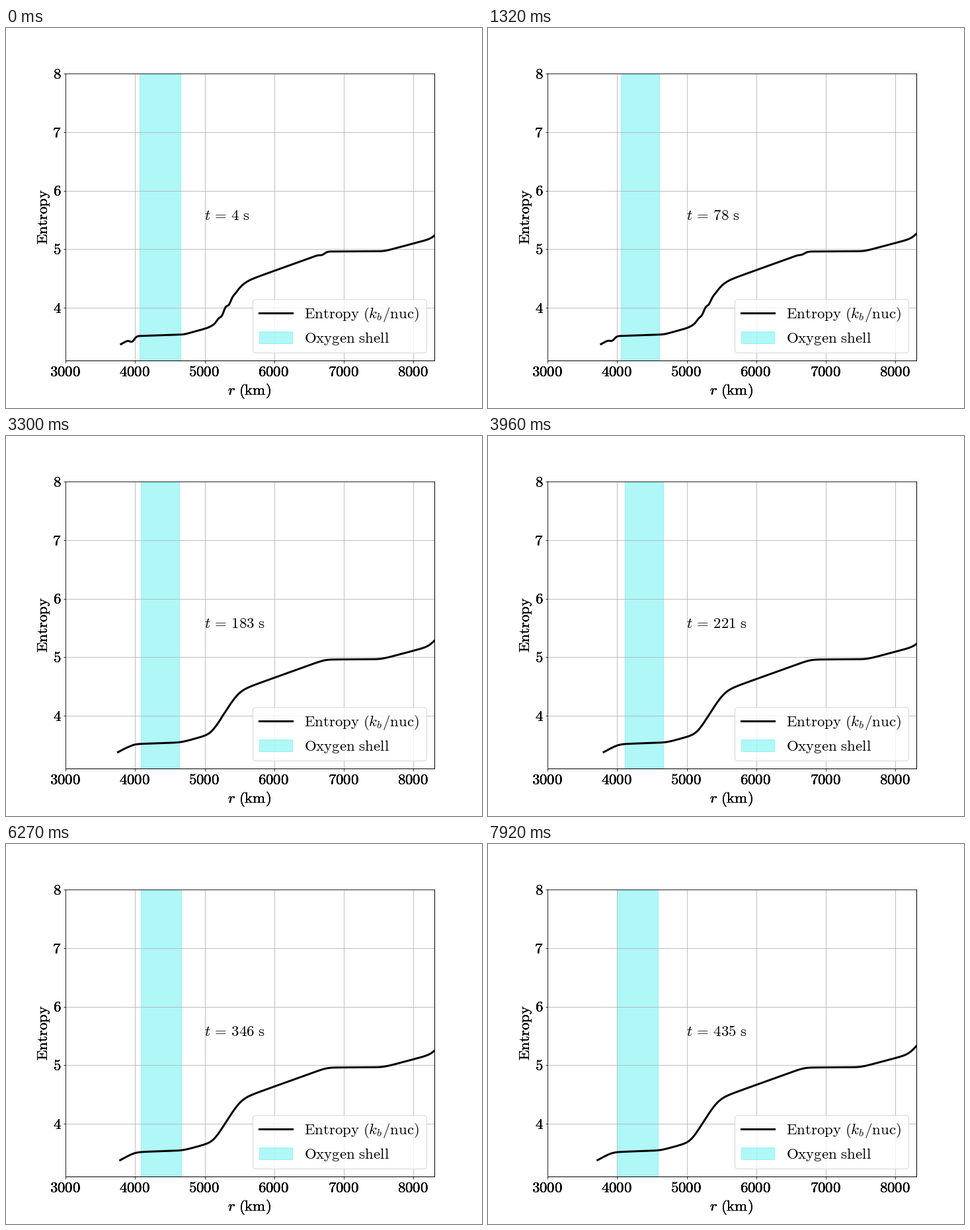
A matplotlib script that plays this animation: 720 by 576 pixels, repeating every 8000 ms.

```python
import matplotlib.pyplot as plt
import numpy as np
from matplotlib.animation import FuncAnimation
from matplotlib.patches import FancyBboxPatch, Rectangle

plt.rcParams["mathtext.fontset"] = "cm"

W, H = 720, 576
LOOP, TICK, STEP = 8000, 40, 330      # ms: loop, drawing interval, simulation step
SIZE = 22.9
SHELL = dict(color=(0, 0.9, 0.9), alpha=0.31, lw=1)

# Corners of the entropy profile in stage pixels, joined by straight runs
corner_x = np.array([176, 198, 271, 317, 358, 489, 574, 648, 660.0])
corner_y = np.array([479.2, 467, 464.6, 452, 386, 338.8, 338.4, 318.8, 304.6])
sharpness = np.array([1.2, 2, 4, 6, 1.5, 3, 4])   # early rounding of inner corners
slope = np.diff(corner_y) / np.diff(corner_x)
grid_x = np.linspace(176, 660, 500)

# Columns: step, time in s, profile shift, inner and outer shell edge
keys = np.array([
    (0, 4, -2, 202, 264), (4, 78, -5, 201, 259), (7, 130.5, -7, 200.6, 258),
    (10, 183, -6.5, 204, 262), (12, 221, -1, 207, 265), (15, 276.5, 0.6, 208, 268),
    (16, 295, 0, 207, 268), (21, 380, -5.4, 202, 263), (24, 435, -10.3, 195, 257)]).T


def bell(x, centre, width):
    return np.exp(-((x - centre) / width) ** 2)


def profile(mix):
    """Rounded polyline; early on it has sharper corners and small steps."""
    width = sharpness + (np.maximum(sharpness, 4.5) - sharpness) * mix
    y = corner_y[0] + slope[0] * (grid_x - corner_x[0])
    for x, bend, w in zip(corner_x[1:-1], np.diff(slope), width):
        y = y + bend * w * np.logaddexp(0, (grid_x - x) / w)
    ripple = 1.2 + 2.6 * np.cos(2 * np.pi * (grid_x - 328) / 12)
    steps = (5.5 * bell(grid_x, 193, 5) + 2 * bell(grid_x, 480, 5)
             + ripple * bell(grid_x, 334, 11))
    return y + (1 - mix) * steps


def to_r(x):
    return 3000 + (x - 90) * 5300 / 558


def to_entropy(y):
    return 3.1 + (504 - y) * 4.9 / 434.88


fig = plt.figure(figsize=(10, 8), dpi=72, facecolor="white")
ax = fig.add_axes([0.125, 0.125, 0.775, 0.755])
ax.set(xlim=(3000, 8300), ylim=(3.1, 8),
       xticks=range(3000, 8001, 1000), yticks=range(4, 9))
ax.tick_params(labelbottom=False, labelleft=False)
ax.grid(color="#b0b0b0", lw=0.8)
ax.spines[["right", "bottom"]].set_linewidth(1)

# Overlay measured in pixels, y downwards
stage = fig.add_axes([0, 0, 1, 1], zorder=5)
stage.set(xlim=(0, W), ylim=(H, 0))
stage.axis("off")


def label(x, y, text, ha="left", layers=1, **kw):
    for _ in range(layers):
        t = stage.text(x, y, text, fontsize=SIZE, ha=ha, va="baseline", **kw)
    return t


for r in range(3000, 8001, 1000):
    label(89 + (r - 3000) * 558 / 5300, 527.7, f"${r}$", "center", 4)
for s in range(4, 9):
    label(83.6, 511.7 - (s - 3.1) * 88.75, f"${s}$", "right", 4)
label(368.3, 556.3, r"$r\ \mathrm{(km)}$", "center", 4)
label(63, 286.3, r"$\mathrm{Entropy}$", "center", 4, rotation=90, rotation_mode="anchor")

stage.add_patch(FancyBboxPatch((373.5, 411.5), 263, 81, fc="white", ec="0.8",
                               alpha=0.8, lw=1,
                               boxstyle="round,pad=0,rounding_size=4.8"))
stage.plot([383, 433], [432, 432], color="black", lw=3)
stage.add_patch(Rectangle((383, 460), 50, 18, **SHELL))
label(450.6, 440.4, r"$\mathrm{Entropy\ (}k_b\mathrm{/nuc)}$")
label(450.6, 477.4, r"$\mathrm{Oxygen\ shell}$")

shell = Rectangle((4000, 3.1), 600, 4.9, zorder=1, **SHELL)
ax.add_patch(shell)
curve, = ax.plot([], [], color="black", lw=3, zorder=3)
time_text = label(300.3, 291, "")


def draw(n):
    k = (n * TICK + TICK - 1) // STEP
    clock, shift, inner, outer = (np.interp(k, keys[0], column) for column in keys[1:])
    u = min(1, k / 12)
    curve.set_data(to_r(grid_x + shift), to_entropy(profile(u * u * (3 - 2 * u))))
    shell.set_x(to_r(inner))
    shell.set_width(to_r(outer) - to_r(inner))
    time_text.set_text(rf"$t\,=\,{round(float(clock))}\ \mathrm{{s}}$")
    return curve, shell, time_text


anim = FuncAnimation(fig, draw, frames=LOOP // TICK, interval=TICK,
                     init_func=lambda: draw(0), repeat=True, repeat_delay=0)
plt.show()
```
